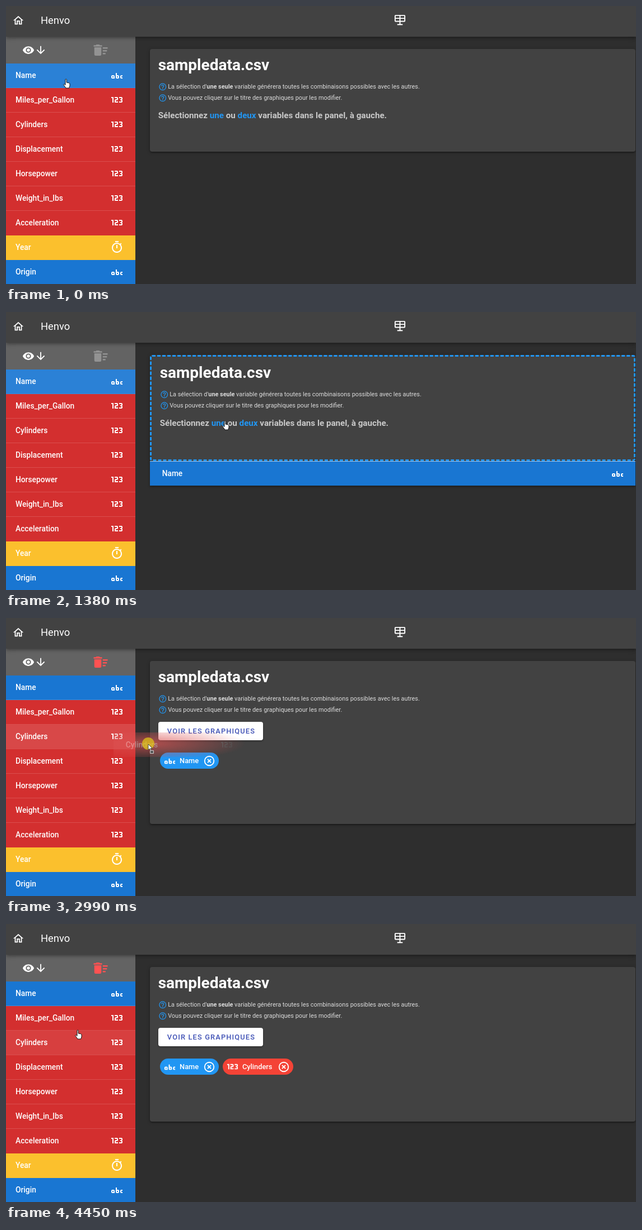
These frames come from a looping animation (1125x498 px, 4530 ms). An HTML page:

```html
<!DOCTYPE html>
<html lang="fr">
<head>
<meta charset="utf-8">
<title>Variables</title>
<style>
html, body { margin: 0; width: 100%; height: 100%; overflow: hidden; background: #2e2e2e; }
body { position: relative; font: 500 13.75px Roboto, sans-serif; color: #fff; }
div, svg, .t { position: absolute; box-sizing: border-box; }
.t { white-space: nowrap; line-height: 30px; margin-top: -15px; }
svg { overflow: visible; fill: currentColor; }
b { font-weight: 700; }
i { font-style: normal; color: #2196f3; }
#bar { left: 0; top: 0; width: 1125px; height: 55px; background: #424242; font-weight: 400;
  box-shadow: 0 2px 4px -1px #0003, 0 4px 5px #0002, 0 1px 10px #0002; }
#side { left: 0; top: 55px; width: 231px; height: 443px; background: #636363; }
.row { left: 0; width: 231px; height: 44px; }
.row.line { border-bottom: 1px solid #ffffff26; }
.glow { inset: 0; background: #fff; opacity: 0; }
#card { left: 257px; top: 77px; width: 867px; background: #424242; border-radius: 4px; font-weight: 400;
  box-shadow: 0 3px 1px -2px #0003, 0 2px 2px #0003, 0 1px 6px #0004; }
#card.over { border: 3px dashed #2196f3; }
#button { left: 14.67px; top: 109px; width: 187px; height: 33px; border-radius: 4px; background: #fff;
  color: #3f51b5; font-weight: 500; font-size: 12.83px; letter-spacing: .0893em; box-shadow: 0 2px 3px #0004; }
.chip { top: 164px; height: 29.33px; border-radius: 15px; font-weight: 500; font-size: 12.83px; }
#drop { left: 257px; width: 867px; height: 44px; border-top: 1px solid #ffffff99; box-shadow: 0 2px 4px #0006; }
.ghost { width: 234px; height: 44px; color: #ffffff99; }
#press { width: 22px; height: 22px; margin: -11px; border-radius: 50%; background: rgba(225, 200, 25, .72); }
</style>
</head>
<body>
<script>
const icons = {
  home: 'M12 5.69L17 10.19V18H15V12H9V18H7V10.19L12 5.69M12 3L2 12H5V20H11V14H13V20H19V12H22L12 3',
  panel: 'M4 2H20A2 2 0 0 1 22 4V13A2 2 0 0 1 20 15H13V19H17V21H7V19H11V15H4A2 2 0 0 1 2 13V4A2 2 0 0 1 4 2ZM4 4V7.5H11V4ZM13 4V7.5H20V4ZM4 9.5V13H11V9.5ZM13 9.5V13H20V9.5Z',
  eye: 'M12 9A3 3 0 0 0 12 15A3 3 0 0 0 12 9M12 17A5 5 0 0 1 12 7A5 5 0 0 1 12 17M12 4.5C7 4.5 2.73 7.61 1 12C2.73 16.39 7 19.5 12 19.5S21.27 16.39 23 12C21.27 7.61 17 4.5 12 4.5Z',
  down: 'M11 4H13V16L18.5 10.5L19.92 11.92L12 19.84L4.08 11.92L5.5 10.5L11 16Z',
  trash: 'M15 16H19V18H15ZM15 8H22V10H15ZM15 12H21V14H15ZM3 18A2 2 0 0 0 5 20H11A2 2 0 0 0 13 18V8H3ZM14 5H11L10 4H6L5 5H2V7H14Z',
  abc: 'M6 11A2 2 0 0 1 8 13V17H4A2 2 0 0 1 2 15V13A2 2 0 0 1 4 11ZM4 13V15H6V13ZM20 13V15H22V17H20A2 2 0 0 1 18 15V13A2 2 0 0 1 20 11H22V13ZM12 7V11H14A2 2 0 0 1 16 13V15A2 2 0 0 1 14 17H12A2 2 0 0 1 10 15V7ZM12 15H14V13H12Z',
  num: 'M4 17V9H2V7H6V17ZM22 15A2 2 0 0 1 20 17H16V15H20V13H18V11H20V9H16V7H20A2 2 0 0 1 22 9V10.5A1.5 1.5 0 0 1 20.5 12A1.5 1.5 0 0 1 22 13.5ZM14 15V17H8V13A2 2 0 0 1 10 11H12V9H8V7H12A2 2 0 0 1 14 9V11A2 2 0 0 1 12 13H10V15Z',
  timer: 'M12 20A7 7 0 0 1 12 6A7 7 0 0 1 12 20M19.03 7.39L20.45 5.97C20 5.46 19.55 5 19.04 4.56L17.62 6A9 9 0 1 0 19.03 7.39M11 14H13V8H11ZM15 1H9V3H15Z',
  help: 'M11 18H13V16H11ZM12 2A10 10 0 0 0 12 22A10 10 0 0 0 12 2M12 20A8 8 0 0 1 12 4A8 8 0 0 1 12 20M12 6A4 4 0 0 0 8 10H10A2 2 0 0 1 14 10C14 12 11 11.75 11 15H13C13 12.75 16 12.5 16 10A4 4 0 0 0 12 6Z',
  close: 'M12 20A8 8 0 0 1 12 4A8 8 0 0 1 12 20M12 2A10 10 0 0 0 12 22A10 10 0 0 0 12 2M14.59 8L12 10.59L9.41 8L8 9.41L10.59 12L8 14.59L9.41 16L12 13.41L14.59 16L16 14.59L13.41 12L16 9.41Z'
};
const BLUE = '#1976d2', RED = '#d32f2f', YELLOW = '#fbc02d';

// Icons are placed by their centre, texts by left edge and middle line.
const icon = (name, x, y, size = 24, style = '') =>
  `<svg viewBox="0 0 24 24" width="${size}" height="${size}" style="left:${x - size / 2}px;top:${y - size / 2}px;${style}"><path fill-rule="evenodd" d="${icons[name]}"/></svg>`;
const text = (html, x, y, style = '') => `<span class="t" style="left:${x}px;top:${y}px;${style}">${html}</span>`;
const iconY = (name, y) => name === 'abc' ? y + 1 : y;

const rows = [
  ['Name', 'abc', BLUE], ['Miles_per_Gallon', 'num', RED], ['Cylinders', 'num', RED],
  ['Displacement', 'num', RED], ['Horsepower', 'num', RED], ['Weight_in_lbs', 'num', RED],
  ['Acceleration', 'num', RED], ['Year', 'timer', YELLOW], ['Origin', 'abc', BLUE]
];
const row = ([label, kind, color], i) =>
  `<div class="row ${i < 6 ? 'line' : ''}" style="top:${48 + 44 * i}px;background:${color}"><div class="glow"></div>
  ${text(label, 17, 21)}${icon(kind, 198.2, iconY(kind, 21))}</div>`;
const chip = (id, label, kind, color, x, w) =>
  `<div class="chip" id="${id}" style="left:${x}px;width:${w}px;background:${color}">${icon(kind, 17, iconY(kind, 14.5), 23)}
  ${text(label, 34.7, 15)}${icon('close', w - 16.5, 14.5, 22)}</div>`;
const ghost = (id, label, kind, color, x, y) => {
  const mask = `radial-gradient(175px 31px at ${x}px ${y}px, rgba(0,0,0,.72), transparent)`;
  return `<div class="ghost" id="${id}" style="background:${color};-webkit-mask-image:${mask};mask-image:${mask}">
    ${text(label, 22, 22)}${icon(kind, 202, iconY(kind, 22))}</div>`;
};

document.body.innerHTML = `
<div id="side">
  ${icon('eye', 40, 24, 22)}${icon('down', 62, 24, 22)}
  <div id="trash">${icon('trash', 168.5, 24, 30)}</div>
  ${rows.map(row).join('')}
</div>
<div id="bar">${icon('home', 22, 25.5, 22)}${text('Henvo', 62, 26, 'font-size:18.33px')}${icon('panel', 703.5, 25.5, 23)}</div>
<div id="card">
  ${text('<b>sampledata.csv</b>', 14.67, 29, 'font-size:28px')}
  ${icon('help', 22.7, 68, 15.5, 'color:#2196f3')}${icon('help', 22.7, 88, 15.5, 'color:#2196f3')}
  ${text("La sélection d'<b>une seule</b> variable générera toutes les combinaisons possibles avec les autres.", 32.2, 68, 'font-size:10.88px;color:#dcdcdc')}
  ${text('Vous pouvez cliquer sur le titre des graphiques pour les modifier.', 32.2, 88, 'font-size:10.88px;color:#dcdcdc')}
  <div id="hint">${text('<b>Sélectionnez <i>une</i> ou <i>deux</i> variables dans le panel, à gauche.</b>', 14.67, 119, 'font-size:15.18px;color:#c9c9c9')}</div>
  <div id="button">${text('VOIR LES GRAPHIQUES', 16.2, 16.5)}</div>
  ${chip('chipName', 'Name', 'abc', '#2196f3', 18.33, 104.5)}
  ${chip('chipCyl', 'Cylinders', 'num', '#f44336', 130.2, 125.5)}
</div>
<div id="drop"></div>
${ghost('ghostName', 'Name', 'abc', '#2a80d6', 82, 16)}
${ghost('ghostCyl', 'Cylinders', 'num', '#dc5252', 62, 20)}
<div id="press"></div>
<svg id="hand" width="1" height="1"><path fill="#fff" stroke="#111" d="M-1 1C-1-.6 1.2-.6 1.2 1V6L5.5 6.8Q7 7.2 7 9V12Q6.5 14 5.5 16H-.2Q-1 14-4 10.5C-4.6 9-3.2 8.4-2.2 9.4L-1 10.5Z"/></svg>
<svg id="arrow" width="1" height="1"><path fill="#fff" stroke="#222" stroke-width=".8" d="M0 1V11L2.4 9L4 12.5L5.6 11.8L4.1 8.4H7.4Z"/>
  <path fill="#555" stroke="#ddd" stroke-width=".9" d="M3.5 12.5H9.5V17.5H3.5Z"/></svg>`;

const $ = id => document.getElementById(id);
const glows = document.querySelectorAll('.glow');
const show = (id, on) => $(id).style.display = on ? '' : 'none';
const move = (id, x, y) => { $(id).style.left = x + 'px'; $(id).style.top = y + 'px'; };
const within = (t, a, b) => t >= a && t < b;
const clamp = v => Math.max(0, Math.min(1, v));
const fade = (t, a, b) => clamp((t - a) / 120) * clamp((b - t) / 120);

// Pointer path: time, x, y
const path = [
  [0, 107, 131], [50, 107, 131], [130, 78, 119], [330, 78, 119], [830, 288, 172],
  [1100, 391, 195], [1500, 391, 195], [1910, 208, 182], [2070, 97, 168], [2300, 78, 200],
  [2530, 73, 212], [2630, 73, 212], [2770, 125, 213], [3230, 393, 239], [3450, 450, 249],
  [3800, 450, 249], [4220, 200, 195], [4450, 128, 190], [4530, 128, 190]
];
function pointer(t) {
  const n = path.findIndex(p => p[0] > t);
  const [a, b] = [path[n - 1], path[n]], k = (t - a[0]) / (b[0] - a[0]);
  return [a[1] + (b[1] - a[1]) * k, a[2] + (b[2] - a[2]) * k];
}

function draw(t) {
  const [x, y] = pointer(t);
  const dragName = within(t, 350, 1300), dragCyl = within(t, 2670, 3640), drag = dragName || dragCyl;
  const picked = t < 1440 ? 0 : t < 3770 ? 1 : 2;
  const over = within(t, 756, 1440) || within(t, 2997, 3770);

  $('trash').style.color = picked ? '#ff5252' : '#939393';
  glows[0].style.opacity = .08 * (t < 350 ? 1 : fade(t, 1260, 2180));
  glows[1].style.opacity = .08 * fade(t, 1940, 2300);
  glows[2].style.opacity = .08 * clamp((t - 2180) / 120) + .14 * clamp((t - 2640) / 60) * clamp((3050 - t) / 200);

  const height = [184, 292, 277][picked] + (over ? 6 : 0);
  $('card').className = over ? 'over' : '';
  $('card').style.height = height + 'px';
  show('hint', !picked);
  show('button', picked);
  show('chipName', picked);
  show('chipCyl', picked > 1);

  show('drop', over);
  if (over) {
    const [label, kind, color] = rows[picked * 2];
    $('drop').style.top = 77 + height + 'px';
    $('drop').style.background = color;
    $('drop').innerHTML = text(label, 21.7, 20.5) + icon(kind, 835, iconY(kind, 20.5));
  }

  show('ghostName', dragName);
  show('ghostCyl', dragCyl);
  move('ghostName', x - 82, y - 16);
  move('ghostCyl', x - 62, y - 20);
  show('press', drag);
  show('arrow', drag);
  show('hand', !drag);
  for (const id of ['press', 'arrow', 'hand']) move(id, x, y);
}

const start = performance.now();
function tick() {
  draw((performance.now() - start) % 4530);
  requestAnimationFrame(tick);
}
tick();
</script>
</body>
</html>
```
